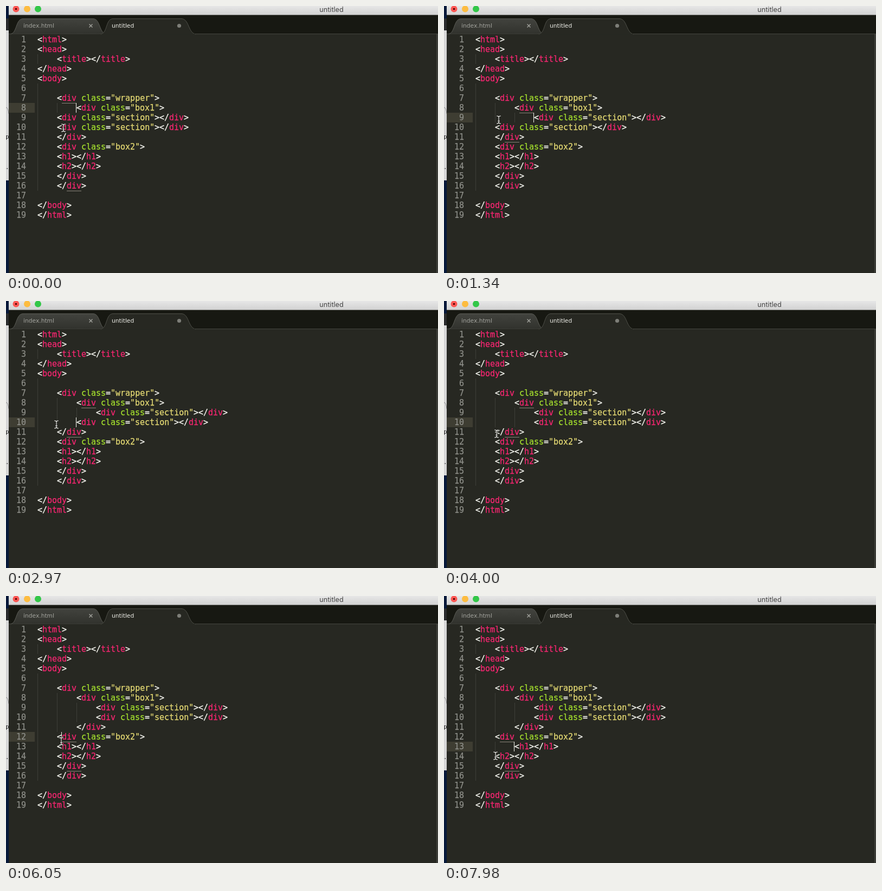
An HTML page that plays this animation: 797 by 493 pixels, repeating every 8 s.

```html
<!DOCTYPE html>
<html lang="en">
<head>
<meta charset="utf-8">
<title>Editor</title>
<style>
  html, body { margin: 0; width: 100%; height: 100%; overflow: hidden; background: #272822; }
  svg { display: block; width: 797px; height: 493px; }
  .code text { font: 15px "DejaVu Sans Mono", monospace; stroke-width: .25px; white-space: pre; }
  .punct { fill: #f8f8f2; stroke: #f8f8f2; }
  .tag { fill: #f92672; stroke: #f92672; }
  .attr { fill: #a6e22e; stroke: #a6e22e; }
  .string { fill: #e6db74; stroke: #e6db74; }
  .number { fill: #8f908a; stroke: #8f908a; text-anchor: end; }
  .guide { fill: #3d3e38; }
  .mark { fill: #88857a; }
  .tab { font: 10.7px "DejaVu Sans", sans-serif; }
</style>
</head>
<body>
<svg viewBox="0 0 797 493">
  <defs>
    <linearGradient id="bar" x2="0" y2="1"><stop stop-color="#e6e6e6"/><stop offset="1" stop-color="#d2d2d2"/></linearGradient>
    <linearGradient id="idle" x2="0" y2="1"><stop stop-color="#42433e"/><stop offset="1" stop-color="#31322d"/></linearGradient>
  </defs>

  <!-- windows behind the editor -->
  <rect width="6" height="493" fill="#07193a"/>
  <rect y="23" width="5" height="22" fill="#2b2c2d"/>
  <rect y="45" width="5" height="277" fill="#d6d6d6"/>
  <path d="M0 187Q4 188 5 199" fill="none" stroke="#8b8b8b"/>
  <g font-family="DejaVu Sans Mono, monospace" font-size="11" fill="#222">
    <text x="-1" y="245">p</text><text x="-1" y="301">.</text>
  </g>

  <!-- window frame -->
  <rect x="5" width="792" height="493" fill="#272822"/>
  <rect x="5" y="17" width="792" height="35" fill="#171812"/>
  <rect x="5" width="792" height="16.5" fill="url(#bar)"/>
  <circle cx="18.5" cy="5.5" r="6" fill="#fc5753"/>
  <circle cx="18.5" cy="5.5" r="1.8" fill="#4d0000"/>
  <circle cx="39" cy="5.5" r="6" fill="#fdbc40"/>
  <circle cx="59" cy="5.5" r="6" fill="#33c748"/>
  <text x="600.5" y="11" text-anchor="middle" fill="#444" style="font:12.6px Inter,sans-serif">untitled</text>

  <!-- tabs -->
  <path d="M5 51.5H797" stroke="#45463f"/>
  <path d="M9 51.5C20 50 18 24 31 23.5H161C174 24 172 50 184 51.5" fill="url(#idle)" stroke="#5b5c56"/>
  <path d="M175 52C187 50 184 24 197 23.5H324C338 24 336 50 350 52" fill="#272822" stroke="#50514a"/>
  <rect x="176" y="51.5" width="173" height="2" fill="#272822"/>
  <text class="tab" x="32" y="40" fill="#a2a39d">index.html</text>
  <text class="tab" x="195" y="40" fill="#f0f0ea">untitled</text>
  <path d="M153.5 33.5l6 6m0-6l-6 6" stroke="#a2a39d" stroke-width="1.4"/>
  <circle cx="319.5" cy="36.5" r="3.6" fill="#7d7e78"/>
  <rect x="794" y="52" width="3" height="441" fill="#3b3c37"/>

  <rect id="gutter" x="5" width="48" height="18" fill="#3e3d32"/>
  <g id="code" class="code"></g>
  <rect id="caret" width="1" height="18" fill="#f8f8f0"/>
  <g id="pointer" fill="none" stroke-linecap="round">
    <path id="beam" d="M-3.5 -7Q-.5 -7 0 -5Q.5 -7 3.5 -7M0 -5V5M-3.5 7Q-.5 7 0 5Q.5 7 3.5 7M-1.5 2.5H1.5" stroke="#22231e" stroke-width="2.6"/>
    <use href="#beam" style="display:none"/>
  </g>
</svg>
<script>
const LOOP = 8000, STEP = 147.5, CELL = 9, TAB = 36, LEFT = 58;
const top_ = row => 53 + 18 * (row - 1);
const $ = id => document.getElementById(id);

// [indent, text] for each line
const source = [
  [0, '<html>'], [0, '<head>'], [1, '<title></title>'], [0, '</head>'], [0, '<body>'],
  [1, ''], [1, '<div class="wrapper">'], [2, '<div class="box1">'],
  [1, '<div class="section"></div>'], [1, '<div class="section"></div>'], [1, '</div>'],
  [1, '<div class="box2">'], [1, '<h1></h1>'], [1, '<h2></h2>'], [1, '</div>'], [1, '</div>'],
  [0, ''], [0, '</body>'], [0, '</html>']
];

// [step, row, caret column, row indent, rows with underlined tags]
const edits = [
  [0, 8, 8, 2, [7, 16]],
  [4, 9, 5, 1, [9]],
  [6, 9, 4, 1, [8, 11]],
  [8, 9, 8, 2, [8, 11]],
  [9, 9, 12, 3, [8, 11]],
  [15, 10, 5, 1, [10]],
  [18, 10, 4, 1, [8, 11]],
  [20, 10, 8, 2, [8, 11]],
  [21, 10, 12, 3, [8, 11]],
  [28, 11, 4, 1, [8, 11]],
  [29, 11, 8, 2, [8, 11]],
  [41, 12, 5, 1, [12, 15]],
  [49, 13, 5, 1, [13]],
  [51, 13, 4, 1, [12, 15]],
  [53, 13, 8, 2, [12, 15]]
];

// [step, x, y] of the pointer
const path = [
  [0, 106, 225], [3, 102, 209], [9, 101, 210], [10, 101, 210], [14, 93, 228],
  [21, 93, 228], [26, 97, 245], [28, 97, 245], [31, 99, 287], [33, 99, 287],
  [39, 102, 268], [44, 102, 268], [48, 98, 279], [51, 98, 279], [54, 95, 295]
];

function add(parent, name, attrs, text) {
  const el = document.createElementNS('http://www.w3.org/2000/svg', name);
  for (const key in attrs) el.setAttribute(key, attrs[key]);
  if (text) el.textContent = text;
  return parent.appendChild(el);
}

function kindOf(token) {
  if (token[0] === '"') return 'string';
  if (token === 'class') return 'attr';
  return /\w/.test(token) ? 'tag' : 'punct';
}

const lines = source.map(([indent, text], i) => {
  const y = top_(i + 1);
  add($('code'), 'text', { class: 'number', x: 37, y: y + 14 }, String(i + 1));
  const guides = [0, 1, 2].map(n =>
    add($('code'), 'rect', { class: 'guide', x: LEFT + n * TAB, y, width: 1, height: 18 }));
  const body = add($('code'), 'g', {});
  const marks = [];
  for (const { 0: token, index } of text.matchAll(/<\/?|>|=|"[^"]*"|\w+/g)) {
    const x = LEFT + index * CELL, kind = kindOf(token);
    add(body, 'text', { class: kind, x, y: y + 14 }, token);
    if (kind === 'tag')
      marks.push(add(body, 'rect', { class: 'mark', x, y: y + 18, width: token.length * CELL, height: 1 }));
  }
  return { indent, guides, body, marks };
});

// light core of the I-beam over its dark edge
const core = $('beam').cloneNode();
core.removeAttribute('id');
core.setAttribute('stroke', '#f4f4f0');
core.setAttribute('stroke-width', '1.1');
$('pointer').appendChild(core);

const show = (el, on) => el.setAttribute('visibility', on ? 'visible' : 'hidden');

function pointerAt(step) {
  const i = Math.max(1, path.findIndex(p => p[0] >= step));
  const [s0, x0, y0] = path[i - 1], [s1, x1, y1] = path[i];
  const u = (step - s0) / (s1 - s0), e = u * u * (3 - 2 * u);
  return [Math.round(x0 + (x1 - x0) * e), Math.round(y0 + (y1 - y0) * e)];
}

function draw(step) {
  const done = edits.filter(e => e[0] <= step);
  const [since, row, column, , marked] = done[done.length - 1];
  const indents = lines.map(line => line.indent);
  for (const [, r, , indent] of done) indents[r - 1] = indent;

  lines.forEach(({ guides, body, marks }, i) => {
    body.setAttribute('transform', `translate(${indents[i] * TAB})`);
    guides.forEach((g, n) => show(g, n < indents[i]));
    marks.forEach(m => show(m, marked.includes(i + 1)));
  });

  $('gutter').setAttribute('y', top_(row));
  $('caret').setAttribute('x', LEFT + column * CELL - 1);
  $('caret').setAttribute('y', top_(row));
  show($('caret'), (step - since) % 7 < 4);
  $('pointer').setAttribute('transform', `translate(${pointerAt(step)})`);
}

let last = -1;
const start = performance.now();
function tick(now) {
  const step = Math.min(54, Math.floor((Math.max(0, now - start) % LOOP) / STEP));
  if (step !== last) draw(last = step);
  requestAnimationFrame(tick);
}
draw(0);
requestAnimationFrame(tick);
</script>
</body>
</html>
```
